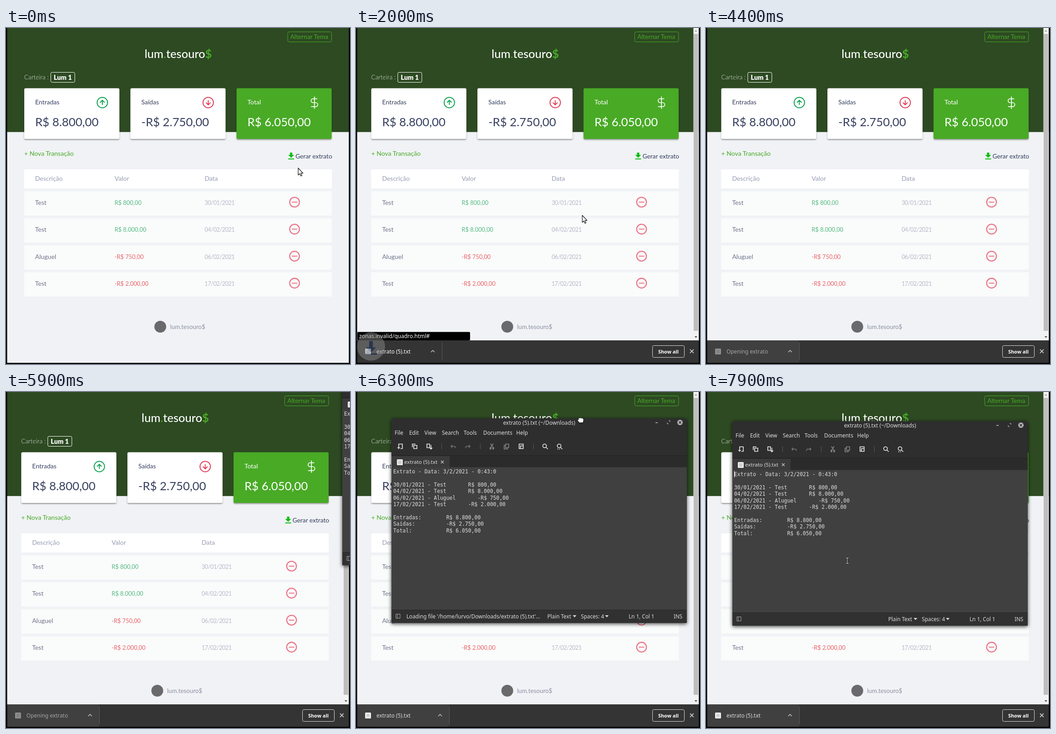
An HTML page for the animation above (8000 ms loop, 757 px wide and 739 px high).

```html
<!DOCTYPE html>
<html lang="pt">
<head>
<meta charset="utf-8">
<style>
html, body { margin: 0; width: 100%; height: 100%; overflow: hidden; background: #000; }
svg { display: block; width: 757px; height: 739px; }
text { white-space: pre; }
.page { font-family: Lato, sans-serif; }
.ui { font-family: "Noto Sans", sans-serif; }
.mono { font-family: "DejaVu Sans Mono", monospace; }
.line { fill: none; }
</style>
</head>
<body>
<svg id="stage" viewBox="0 0 757 739">
  <defs>
    <filter id="cardShadow" x="-10%" y="-10%" width="120%" height="130%"><feDropShadow dx="0" dy="2" stdDeviation="1.6" flood-opacity=".4"/></filter>
    <filter id="winShadow" x="-5%" y="-5%" width="110%" height="112%"><feDropShadow dx="0" dy="2" stdDeviation="4" flood-opacity=".75"/></filter>
    <clipPath id="itemClip"><rect x="3" y="1" width="202" height="50"/></clipPath>
  </defs>
  <rect width="757" height="739" fill="#f0f2f5"/>
  <rect width="757" height="228.8" fill="#2d4a22"/>
  <g id="page" class="page"></g>
  <g id="scroll"></g>
  <g id="bubble" class="ui"></g>
  <g id="shelf" class="ui"></g>
  <g id="drop">
    <circle r="31" fill="#8a8a8a"/>
    <path d="M-4-12H4V2H11L0 13-11 2H-4ZM-13 15H13V18H-13Z" fill="#1f3864"/>
  </g>
  <path d="M0 0H2.5V736.5H754.5V0H757V739H0Z"/>
  <g id="win" class="ui"></g>
  <g id="cursor" stroke-linejoin="round">
    <path id="arrow" d="M0 0V15.5L3.4 12.4 5.8 17.6 8.2 16.5 5.9 11.4H10.5Z" fill="#fff" stroke="#111" stroke-width="1.2"/>
    <path id="hand" d="M-1.5 1Q0-1 1.5 1V7L7 8.5Q9 9 8.5 12L7 17H-1L-6 10.5Q-5.5 8-3 9.5L-1.5 11Z" fill="#fff" stroke="#111" stroke-width="1.2"/>
    <path id="grab" d="M-5-3Q-3.5-6-2-4 0-6 1.5-4 4-5.5 4.5-3 7-3 6.5 0L5 6H-3L-7 1Q-7-1-5-.5Z" fill="#fff" stroke="#111"/>
    <g id="beam" class="line"><path d="M-3-6H3M0-6V6M-3 6H3" stroke="#111" stroke-width="3"/><path d="M-3-6H3M0-6V6M-3 6H3" stroke="#fff"/></g>
  </g>
</svg>
<script>
const $ = id => document.getElementById(id);
const text = (x, y, s, size, fill, extra = '') =>
  `<text x="${x}" y="${y}" font-size="${size}" fill="${fill}" ${extra}>${s}</text>`;
const rect = (x, y, w, h, fill, extra = '') =>
  `<rect x="${x}" y="${y}" width="${w}" height="${h}" fill="${fill}" ${extra}/>`;
const line = (d, color, width = 1, extra = '') =>
  `<path class="line" d="${d}" stroke="${color}" stroke-width="${width}" ${extra}/>`;
const circle = (x, y, r, fill, extra = '') =>
  `<circle cx="${x}" cy="${y}" r="${r}" fill="${fill}" ${extra}/>`;
const paper = (x, y, fill) => rect(x, y, 13, 13, fill, 'rx="1.5"') +
  line(`M${x + 3} ${y + 4}h7m-7 2.5h7m-7 2.5h7`, '#999', .8);
const MIDDLE = 'text-anchor="middle"', LIGHT = 'font-weight="300"', MEDIUM = 'font-weight="500"';
const GREEN = '#49aa26', INK = '#363f5f';

function card(x, label, value, icon, fill = '#fff', ink = INK) {
  return rect(x, 132.5, 209.3, 111.5, fill, 'rx="3" filter="url(#cardShadow)"') +
    text(x + 24, 168, label, 14, ink) + text(x + 24, 216, value, 25.8, ink) + icon;
}
const arrowIcon = (x, color, dir) => circle(x, 164, 11.5, 'none', `stroke="${color}" stroke-width="2"`) +
  line(`M${x} ${164 + 5 * dir}V${164 - 5 * dir}M${x - 5} 164L${x} ${164 - 5 * dir}L${x + 5} 164`, color, 2);

function row([name, value, date], i) {
  const y = 359 + i * 59.4;
  return rect(40, y, 677, 53.5, '#fafbfb') +
    text(64, y + 30, name, 14, '#6e748a') +
    text(239, y + 30, value, 12.9, value[0] == '-' ? '#eb6468' : '#55ba83') +
    text(437, y + 30, date, 12.8, '#b5bac9', 'letter-spacing="-.5"') +
    circle(635, y + 24, 10.7, 'none', 'stroke="#ea7587" stroke-width="2.3"') +
    line(`M629 ${y + 24}h12`, '#ea7587', 2);
}
const entries = [
  ['Test', 'R$ 800,00', '30/01/2021'], ['Test', 'R$ 8.000,00', '04/02/2021'],
  ['Aluguel', '-R$ 750,00', '06/02/2021'], ['Test', '-R$ 2.000,00', '17/02/2021']];

$('page').innerHTML =
  rect(620, 8.5, 96.5, 22, 'none', `rx="3" stroke="${GREEN}"`) + text(625.5, 24, 'Alternar Tema', 13.7, GREEN) +
  text(379, 66, `lum<tspan fill="${GREEN}">.</tspan>tesouro<tspan fill="${GREEN}" font-weight="700">$</tspan>`, 25.5, '#fff', MIDDLE + ' ' + MEDIUM) +
  text(40, 113, 'Carteira :', 13.7, '#e3e8e1', LIGHT) +
  rect(98.5, 97.5, 53, 22, 'none', 'rx="3" stroke="#fff"') + text(125, 114, 'Lum 1', 14.5, '#fff', MIDDLE + ' font-weight="900"') +
  card(40.2, 'Entradas', 'R$ 8.800,00', arrowIcon(212, '#12a454', 1)) +
  card(273.8, 'Saídas', '-R$ 2.750,00', arrowIcon(445, '#e0405a', -1)) +
  card(507.3, 'Total', 'R$ 6.050,00',
    line('M17 5H9.5a3.5 3.5 0 0 0 0 7h5a3.5 3.5 0 0 1 0 7H6M12 1V23', '#fff', 1.4, 'transform="translate(664 149.5) scale(1.23)"'), GREEN, '#fff') +
  text(40, 281, '+ Nova Transação', 14.1, GREEN) +
  '<path d="M625 274h5v5h4l-6.5 6.5-6.5-6.5h4ZM621 287h13v2h-13Z" fill="#0ebd13"/>' +
  text(637, 286.5, 'Gerar extrato', 13.8, INK) +
  rect(40, 311, 677, 42, '#fff') +
  ['Descrição', 'Valor', 'Data'].map((s, i) => text([64, 239, 437][i], 336, s, 14, '#969cb3')).join('') +
  entries.map(row).join('') +
  circle(339.5, 657, 13, '#6a6a6c') + text(361, 662, 'lum.tesouro$', 13.4, '#8b90a3');

$('scroll').innerHTML = rect(742.5, 0, 12, 739, '#f1f1f1') + rect(743, 13, 10, 653, '#bebebe') +
  '<path d="M745 8h6l-3-3.5Z" fill="#a3a3a3"/><path d="M745 678h6l-3 3.5Z" fill="#444"/>';

$('bubble').innerHTML = rect(3, -17.5, 248, 18.5, '#000', 'rx="2"') + text(7, -4, 'zonas.invalid/quadro.html#', 12, '#fff');

$('shelf').innerHTML = rect(0, 1, 757, 52, '#343434') +
  `<g clip-path="url(#itemClip)">${rect(3, 0, 202, 51, '#404040', 'id="hover"')}${circle(93, 25, 64, '#4a4a4a', 'id="ripple"')}</g>` +
  `<g id="fileIcon">${paper(20, 19, '#eee')}</g>` + text(45, 30, '', 11.9, '#fff', 'id="fileName"') +
  `<g id="itemEnd">${line('M165 27l4-4 4 4', '#ccc', 1.4) + line('M189.5 6V45', '#5c5c5c')}</g>` +
  rect(652.5, 12.5, 70, 26, 'none', 'rx="3" stroke="#ddd"') +
  text(687.5, 30, 'Show all', 10.9, '#fff', MIDDLE + ' font-weight="600"') +
  line('M735 21l8 8m0-8l-8 8', '#ddd', 1.6);

// Editor window, in its own coordinates
const pad = (s, n) => s.padEnd(n);
const lines = ['Extrato - Data: 3/2/2021 - 0:43:0', '',
  ...entries.map(([name, value, date]) => pad(`${date} - ${name}`, name == 'Test' ? 24 : 27) + value), '',
  pad('Entradas:', 17) + 'R$ 8.800,00', pad('Saídas:', 17) + '-R$ 2.750,00', pad('Total:', 17) + 'R$ 6.050,00'];
const menu = { File: 7, Edit: 39, View: 72.5, Search: 111, Tools: 159, Documents: 202, Help: 274.5 };
const tool = (x, d, color = '#eee') => line(d, color, 1.6, `transform="translate(${x} 61.5)"`);
const lens = 'M3-1A4 4 0 1 1-5-1A4 4 0 1 1 3-1M2 2L6 6';

$('win').innerHTML =
  `<path d="M0 450V4Q0 0 4 0H646Q650 0 650 4V450Z" fill="#2f2f2f" filter="url(#winShadow)"/>` +
  text(325, 14, 'extrato (5).txt (~/Downloads)', 11.9, '#ddd', MIDDLE) +
  line('M581 9.5h5', '#ccc', 1.4) + line('M608 11l-1 1m5-6l1-1M607 9v3h3M610 5h3v3', '#bbb', 1) +
  circle(635, 9, 6, '#b0b0b0') + line('M632.5 6.5l5 5m0-5l-5 5', '#2f2f2f', 1.5) +
  Object.entries(menu).map(([s, x]) => text(x, 36, s, 11.9, '#e0e0e0')).join('') +
  tool(19, 'M-3 2V-5H5V5H1M-6 3H0M-3 0V6') + tool(51, 'M-5 2V-5H2M-2-2H5V5H-2Z') +
  tool(83, 'M-5-5H1V3H-5ZM4-3V5M1 3L4 6 7 3') +
  tool(136, 'M-5 0H2Q5 0 5 4M-2-3L-5 0-2 3', '#777') + tool(168, 'M5 0H-2Q-5 0-5 4M2-3L5 0 2 3', '#777') +
  tool(221, 'M-3-6L3 3M3-6L-3 3M-4 3v3h2v-3ZM2 3v3h2v-3Z', '#888') +
  tool(253, 'M-2-5H5V3H-2ZM-2-2H-5V6H2V3', '#888') + tool(285, 'M-4-5H5V5H-4ZM-2-5H3M-1-1H5V5H-1Z') +
  tool(338, lens) + tool(370, lens + 'M-5 6H-3M-1 6H1') +
  [110, 195, 312].map(x => line(`M${x}.5 55V68`, '#5a5a5a')).join('') +
  rect(0, 81, 650, 1, '#222') + rect(0, 82, 650, 26, '#2b2b2b') + rect(0, 83, 128, 25, '#3b3b3b') +
  paper(12, 90, '#e8e8e8') + text(28, 100, 'extrato (5).txt', 11.6, '#ddd') + line('M109 93l6 6m0-6l-6 6', '#bbb', 1.5) +
  rect(0, 107.5, 650, 314.5, '#404040') +
  `<g class="mono">${lines.map((s, i) => text(4, 121 + i * 14.43, s, 11.42, '#ddd')).join('')}</g>` +
  rect(4, 110, 1, 14, '#fff', 'id="caret"') +
  rect(0, 422, 650, 28, '#313131') + rect(0, 421, 650, 1, '#252525') +
  line('M10 430.5h9v9h-9ZM13 431v9', '#aaa') +
  text(33, 440, "Loading file '/home/lurvo/Downloads/extrato (5).txt'…", 11.7, '#ddd', 'id="status"') +
  [[343, 'Plain Text'], [417, 'Spaces: 4'], [522, 'Ln 1, Col 1'], [621, 'INS']].map(([x, s]) => text(x, 440, s, 11.7, '#ddd')).join('') +
  '<path d="M399 433h8l-4 4.5ZM470 433h8l-4 4.5Z" fill="#ddd"/>';

// Keys are [time, value...]
const cursorPath = [[0, 643, 308], [100, 491, 370], [200, 640, 272], [1800, 640, 272], [2000, 498, 412],
  [2300, 628, 474], [3100, 628, 474], [3400, 93, 713], [3700, 93, 713], [4000, 57, 496], [4400, 790, -30],
  [5900, 1092, -50], [6100, 541, 46], [6500, 448, 77], [7200, 448, 77], [7800, 311, 371]];
const windowPath = [[5900, 740, -69], [6100, 189, 26], [6200, 115, 47], [6300, 78, 58], [6500, 58, 64]];

function at(keys, t) {
  const i = keys.findIndex(k => k[0] > t);
  if (i < 0) return keys[keys.length - 1].slice(1);
  if (!i) return keys[0].slice(1);
  const a = keys[i - 1], b = keys[i], p = (t - a[0]) / (b[0] - a[0]);
  return a.slice(1).map((v, n) => v + (b[n + 1] - v) * p);
}
const move = (id, x, y) => $(id).setAttribute('transform', `translate(${x} ${y})`);
const show = (id, on) => $(id).setAttribute('opacity', +on);

function draw(time) {
  const t = Math.floor(time / 100) * 100;
  const shelfOpen = t >= 1600;
  const [shelfY] = at([[1500, 737], [1800, 686]], t);
  move('page', shelfOpen ? -6.6 : 0, 0);
  show('scroll', shelfOpen);
  move('shelf', 0, shelfY);
  move('bubble', 0, shelfY);
  show('bubble', at([[300, 0], [600, 1], [2700, 1], [3000, 0]], t)[0]);

  move('drop', 33, at([[1800, 721], [2300, 670]], t)[0]);
  show('drop', at([[1700, 0], [2000, .48], [2400, 0]], t)[0]);

  const opening = t >= 3400 && t < 6300;
  $('fileName').textContent = opening ? 'Opening extrato' : 'extrato (5).txt';
  $('fileName').setAttribute('fill', opening ? '#a6a6a6' : t < 3400 ? '#fff' : '#ddd');
  show('fileIcon', opening ? .45 : 1);
  move('itemEnd', t < 3400 ? 0 : 16, 0);
  show('hover', t >= 3300);
  show('ripple', t >= 3300 && t < 3700 ? .6 : 0);

  show('win', t >= 5900);
  move('win', ...at(windowPath, t));
  show('status', t < 7000);
  show('caret', t >= 6900 && t < 7400 || t >= 7900);

  const [x, y] = at(cursorPath, t);
  const kind = t >= 200 && t <= 1800 ? 'hand' : t >= 5900 && t < 7300 ? 'grab' : t >= 7300 && y > 171 ? 'beam' : 'arrow';
  for (const id of ['arrow', 'hand', 'grab', 'beam']) show(id, id == kind);
  move('cursor', x, y);
}

const start = performance.now();
(function tick() {
  draw((performance.now() - start) % 8000);
  requestAnimationFrame(tick);
})();
</script>
</body>
</html>
```
